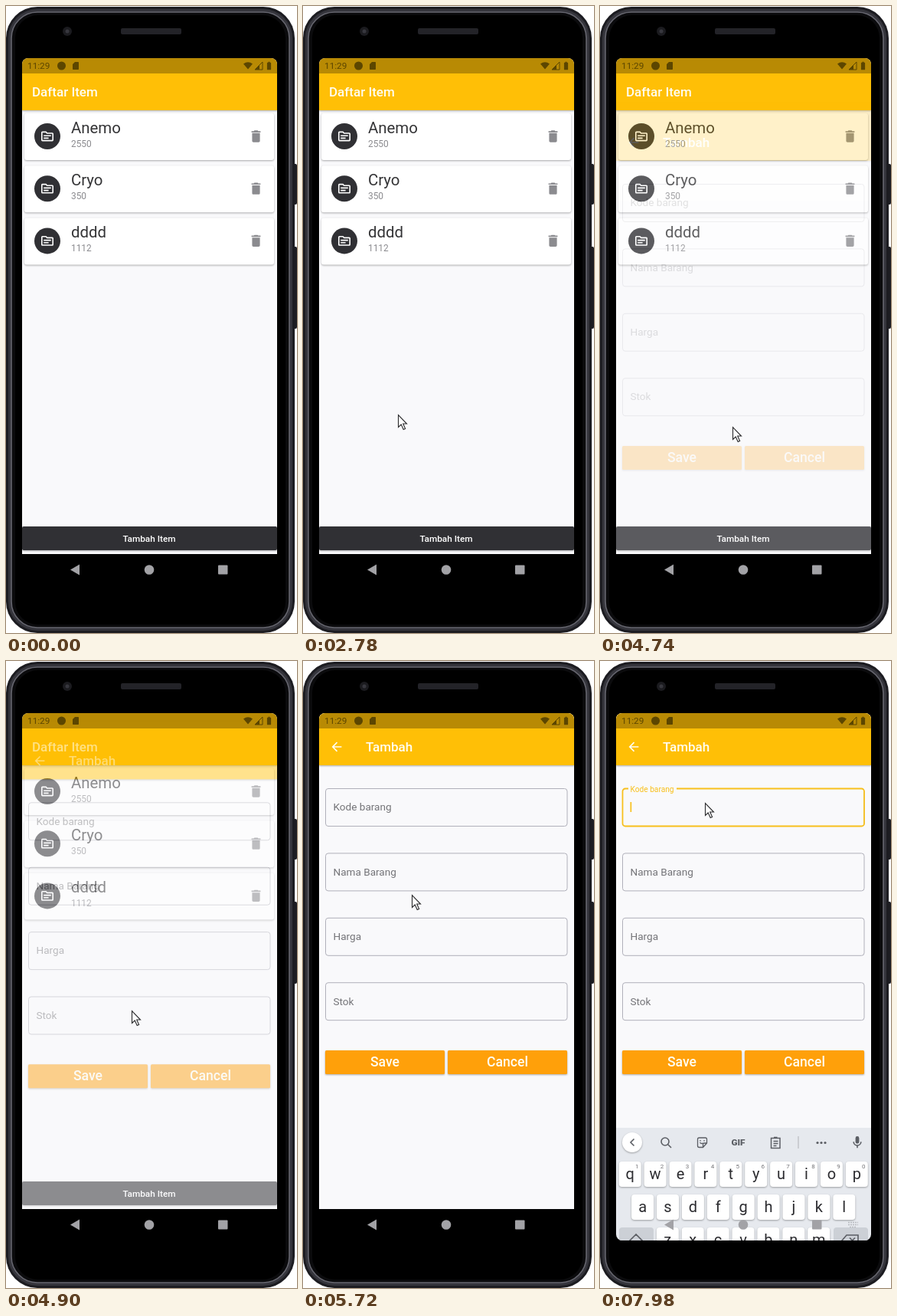
An HTML page that plays this animation: 380 px wide and 818 px high, repeating every 8000 ms.

```html
<!DOCTYPE html>
<html lang="id">
<head>
<meta charset="utf-8">
<title>Daftar Item</title>
<style>
html, body { margin: 0; width: 100%; height: 100%; overflow: hidden; background: #fff; }
svg { display: block; width: 380px; height: 818px; }
text { font-family: Roboto, sans-serif; white-space: pre; }
.shadow { filter: drop-shadow(0 1px 1px rgba(0, 0, 0, .32)); }
</style>
</head>
<body>
<svg id="stage" viewBox="0 0 380 818" xmlns="http://www.w3.org/2000/svg"></svg>
<script>
const LOOP = 8000;
const PAPER = '#f9f9fb', AMBER = '#ffbf06', INK = '#303034', MUTED = '#8b8b8f', HINT = '#747478',
  FOCUS = '#f8c01c', TOOL = '#5b5e64';

const ICONS = {
  trash: 'M6 19c0 1.1.9 2 2 2h8c1.1 0 2-.9 2-2V7H6zM19 4h-3.5l-1-1h-5l-1 1H5v2h14z',
  folder: 'M20 6h-8l-2-2H4c-1.1 0-2 .9-2 2v12c0 1.1.9 2 2 2h16c1.1 0 2-.9 2-2V8c0-1.1-.9-2-2-2zm0 12H4V6h5.2l2 2H20zm-2-6H6v-2h12zm-4 4H6v-2h8z',
  back: 'M20 11H7.8l5.6-5.6L12 4l-8 8 8 8 1.4-1.4L7.8 13H20z',
  card: 'M18 2h-8L4 8v12c0 1.1.9 2 2 2h12c1.1 0 2-.9 2-2V4c0-1.1-.9-2-2-2z',
  wifi: 'M12 21L0 7Q12-2 24 7z',
  battery: 'M15.7 4H14V2h-4v2H8.3C7.6 4 7 4.6 7 5.3V21c0 .6.6 1 1.3 1h7.4c.7 0 1.3-.4 1.3-1V5.3C17 4.6 16.4 4 15.7 4z',
  mic: 'M12 14c1.7 0 3-1.3 3-3V5a3 3 0 0 0-6 0v6c0 1.7 1.3 3 3 3zm5-3a5 5 0 0 1-10 0H5c0 3.4 2.7 6.2 6 6.7V21h2v-3.3c3.3-.5 6-3.3 6-6.7z'
};

const text = (x, y, size, fill, str, extra = '') =>
  `<text x="${x}" y="${y}" font-size="${size}" fill="${fill}" ${extra}>${str}</text>`;
const rect = (x, y, w, h, fill, r = 0, extra = '') =>
  `<rect x="${x}" y="${y}" width="${w}" height="${h}" rx="${r}" fill="${fill}" ${extra}/>`;
const circle = (x, y, r, fill, extra = '') => `<circle cx="${x}" cy="${y}" r="${r}" fill="${fill}" ${extra}/>`;
const path = (d, fill, extra = '') => `<path d="${d}" fill="${fill}" ${extra}/>`;
const icon = (name, x, y, scale, fill) =>
  path(ICONS[name], fill, `transform="translate(${x} ${y}) scale(${scale}) translate(-12 -12)"`);
const MID = 'text-anchor="middle"', BOLD = 'font-weight="500"', SHADOW = 'class="shadow"';

function phone() {
  return rect(375, 206, 5, 53, '#1d1d22', 2) + rect(375, 314, 5, 107, '#1d1d22', 2) +
    rect(0, 1, 377, 817, '#1c1c21', 41) +
    rect(3, 4, 371, 811, '#35353c', 38) +
    rect(7, 8, 363, 803, '#0b0b0d', 34, 'stroke="#66666f" stroke-width="1.6"') +
    rect(12, 12, 353, 795, '#000', 30) +
    rect(150, 29, 79, 8, '#232328', 2) +
    circle(80, 33, 6, '#1b1b1f') + circle(80, 33, 2.5, '#37373e');
}

function appBar(title, x) {
  return rect(21, 60, 333, 76, AMBER, 0, SHADOW) + text(x, 118, 17, '#fffdf2', title, BOLD);
}

function listPage() {
  const items = [['Anemo', 2550], ['Cryo', 350], ['dddd', 1112]];
  return rect(21, 68, 333, 647, PAPER) + appBar('Daftar Item', 34) +
    items.map(([name, count], i) => {
      const y = 140 + 68.2 * i;
      return rect(24, y, 326, 61, '#fff', 3, SHADOW) +
        circle(54, y + 30, 17, INK) + icon('folder', 54, y + 30, .8, '#fff') +
        text(85, y + 26, 20.4, '#343436', name) +
        text(85, y + 43.8, 11.9, MUTED, count) +
        icon('trash', 326.5, y + 30, .848, MUTED);
    }).join('') +
    rect(21, 679, 333, 31, INK, 2, SHADOW) +
    text(187, 698.5, 11.8, '#fff', 'Tambah Item', `${MID} ${BOLD}`);
}

function button(x, label) {
  return rect(x, 508, 156, 31, '#ffa00a', 1.5, SHADOW) +
    text(x + 78, 529, 17.6, '#fffdf2', label, `${MID} ${BOLD}`);
}

function formPage() {
  const labels = ['Kode barang', 'Nama Barang', 'Harga', 'Stok'];
  return rect(21, 68, 333, 647, PAPER) + appBar('Tambah', 82) + icon('back', 44, 112, .8, '#fffdf2') +
    labels.map((label, i) => {
      const y = 166 + 84.4 * i;
      const box = rect(29.5, y + .5, 315.5, 49, 'none', 3.5, 'stroke="#b0b0ba"');
      return box + (i ? text(39.5, y + 29.3, 13.57, HINT, label) : '');
    }).join('') +
    '<g id="focus">' + rect(29.5, 166.5, 315.5, 49, 'none', 3.5, `stroke="${FOCUS}" stroke-width="1.8"`) +
    rect(37, 164, 63, 5, PAPER) + '</g>' +
    rect(39.5, 184, 1.7, 13, FOCUS, 0, 'id="caret"') +
    text(0, 0, 13.57, HINT, labels[0], 'id="label"') +
    button(29, 'Save') + button(189, 'Cancel');
}

function keyboard() {
  const line = (d, w = 1.6) => path(d, 'none', `stroke="${TOOL}" stroke-width="${w}"`);
  const key = (x, y, ch, i, top) => rect(x - 14.5, y, 29, 33, '#fff', 4, SHADOW) +
    text(x, y + 23, 20, '#2c2c30', ch, MID) +
    (top ? text(x + 9, y + 9, 8, HINT, (i + 1) % 10, MID) : '');
  const row = (chars, x, y, top) => [...chars].map((ch, i) => key(x + 32.9 * i, y, ch, i, top)).join('');
  return rect(21, 609, 333, 300, '#e6e9ee') +
    circle(42, 628, 13, '#fff', SHADOW) + line('M44.5 623.5L40 628l4.5 4.5') +
    line('M88.5 630.5L93 635M90 627a5 5 0 1 1-10 0a5 5 0 1 1 10 0') +
    line('M129.500 622h8a2 2 0 0 1 2 2v5l-5 5.500h-5a2 2 0 0 1-2-2v-8.500a2 2 0 0 1 2-2zM139 629h-3q-1.500 0-1.500 1.500v3.500M130.500 628q1.500 2.500 4 1M131 625v1.500M136 625v1.500', 1.3) +
    text(180.5, 632.4, 11.8, TOOL, 'GIF', `${MID} font-weight="800"`) +
    line('M223.5 622.5h11.5v13h-11.5zM226.5 626.5h6M226.5 629.5h6M226.5 632.5h4M227 621.5h4.5', 1.5) +
    line('M259 620v16', .4) +
    [284, 289, 294].map(x => circle(x, 628.5, 1.6, TOOL)).join('') +
    icon('mic', 336, 628, .8, TOOL) +
    row('qwertyuiop', 39.2, 653, true) + row('asdfghjkl', 55.6, 696) + row('zxcvbnm', 88.3, 739) +
    rect(25, 739, 45, 33, '#ccd0d6', 4) + line('M47 748l-9 9h5v6h8v-6h5z') +
    rect(305, 739, 45, 33, '#ccd0d6', 4) + line('M316 756l6-7h15v14h-15zM326 752.5l7 7M333 752.5l-7 7');
}

function statusBar() {
  const ink = '#5c4600';
  return rect(21, 68, 333, 20, '#000', 0, 'opacity=".28"') +
    text(28, 82.3, 11.8, ink, '11:29') + circle(72.5, 78, 5.5, ink) + icon('card', 91, 78, .5, ink) +
    icon('wifi', 316, 78, .5, ink) + path('M335 73v10h-10z', 'none', `stroke="${ink}"`) +
    path('M331 77v6h-6z', ink) + icon('battery', 343.5, 78, .52, ink);
}

function navIcons() {
  const fill = '#a2a2a6';
  return path('M84 735.5l12-7v14z', fill) + circle(187, 735.5, 6.3, fill) + rect(277, 729.5, 12.5, 12, fill, 1);
}

document.getElementById('stage').innerHTML =
  `<clipPath id="screen"><rect x="21" y="68" width="333" height="688" rx="8"/></clipPath>
   <clipPath id="pages"><rect x="21" y="68" width="333" height="647"/></clipPath>
   ${phone()}
   <g clip-path="url(#screen)">
     <g clip-path="url(#pages)">${listPage()}<g id="form">${formPage()}</g></g>
     ${statusBar()}
     <g id="keys">${keyboard()}</g>
     ${navIcons()}
     <g id="switch">${path('M324 732.5h13M324 735.5h13M326 738.5h9', 'none', 'stroke="#b9bbc0" stroke-width="1.5" stroke-dasharray="2 1"')}</g>
   </g>
   <path id="pointer" d="M.5.5V16.5l3.7-3.5 3 6.5 2.4-1.1-2.9-6.4H11.5z" fill="#fff" stroke="#2a2a2c" stroke-width="1.1"/>`;

const part = Object.fromEntries(['form', 'focus', 'caret', 'label', 'keys', 'switch', 'pointer']
  .map(id => [id, document.getElementById(id)]));

// time, x, y of the pointer tip
const POINTER = [
  [1400, 153, 578], [2120, 76, 482], [2220, 76, 482], [2380, 80, 456], [2540, 110, 521], [2760, 110, 521],
  [2780, 123, 533], [3100, 333, 640], [3520, 178, 692], [3620, 178, 692], [3660, 177, 689], [4200, 177, 689],
  [4740, 173, 550], [4920, 163, 445], [5020, 163, 445], [5060, 160, 421], [5160, 160, 421], [5720, 142, 306],
  [5760, 146, 284], [5860, 146, 284], [6160, 132, 241], [6300, 132, 241], [6600, 146, 210], [6980, 137, 185]
];
// time, progress of the page transition
const PAGE = [[4452, 0], [4740, .4], [4920, .65], [5019, .65], [5020, .79], [5060, .845], [5159, .845], [5160, .985], [5180, 1]];

function sample(table, t) {
  if (t <= table[0][0]) return table[0].slice(1);
  const i = table.findIndex(row => row[0] > t);
  if (i < 0) return table.at(-1).slice(1);
  const a = table[i - 1], b = table[i], k = (t - a[0]) / (b[0] - a[0]);
  return a.slice(1).map((v, j) => v + (b[j + 1] - v) * k);
}

function bezier(x1, y1, x2, y2) {
  const at = (a, b, s) => 3 * (1 - s) ** 2 * s * a + 3 * (1 - s) * s * s * b + s ** 3;
  return x => {
    let lo = 0, hi = 1;
    for (let i = 0; i < 20; i++) {
      const s = (lo + hi) / 2;
      if (at(x1, x2, s) < x) lo = s; else hi = s;
    }
    return at(y1, y2, (lo + hi) / 2);
  };
}
const fastOutSlowIn = bezier(.4, 0, .2, 1), easeIn = bezier(.42, 0, 1, 1);
const span = (t, from, to) => Math.min(1, Math.max(0, (t - from) / (to - from)));

function draw(t) {
  const [p] = sample(PAGE, t);
  part.form.setAttribute('opacity', p >= 1 ? 1 : easeIn(p));
  part.form.setAttribute('visibility', p > 0 ? 'visible' : 'hidden');
  part.form.setAttribute('transform', `translate(0 ${172 * (1 - fastOutSlowIn(p))})`);

  const f = fastOutSlowIn(span(t, 7430, 7680));
  part.focus.setAttribute('opacity', f);
  part.caret.setAttribute('opacity', t >= 7420 ? 1 : 0);
  part.label.setAttribute('transform', `translate(39.5 ${195.3 - 24.5 * f}) scale(${1 - .25 * f})`);
  part.label.style.fill = `color-mix(in srgb, ${FOCUS} ${100 * f}%, ${HINT})`;

  const k = span(t, 7780, 7980);
  part.keys.setAttribute('transform', `translate(0 ${150 * (1 - k) ** 2})`);
  part.keys.setAttribute('visibility', k > 0 ? 'visible' : 'hidden');
  part.switch.setAttribute('visibility', k > .5 ? 'visible' : 'hidden');

  const [x, y] = sample(POINTER, t);
  part.pointer.setAttribute('transform', `translate(${Math.round(x)} ${Math.round(y)})`);
  part.pointer.setAttribute('visibility', t >= 1400 ? 'visible' : 'hidden');
}

const start = performance.now();
function tick() {
  draw((performance.now() - start) % LOOP);
  requestAnimationFrame(tick);
}
tick();
</script>
</body>
</html>
```
